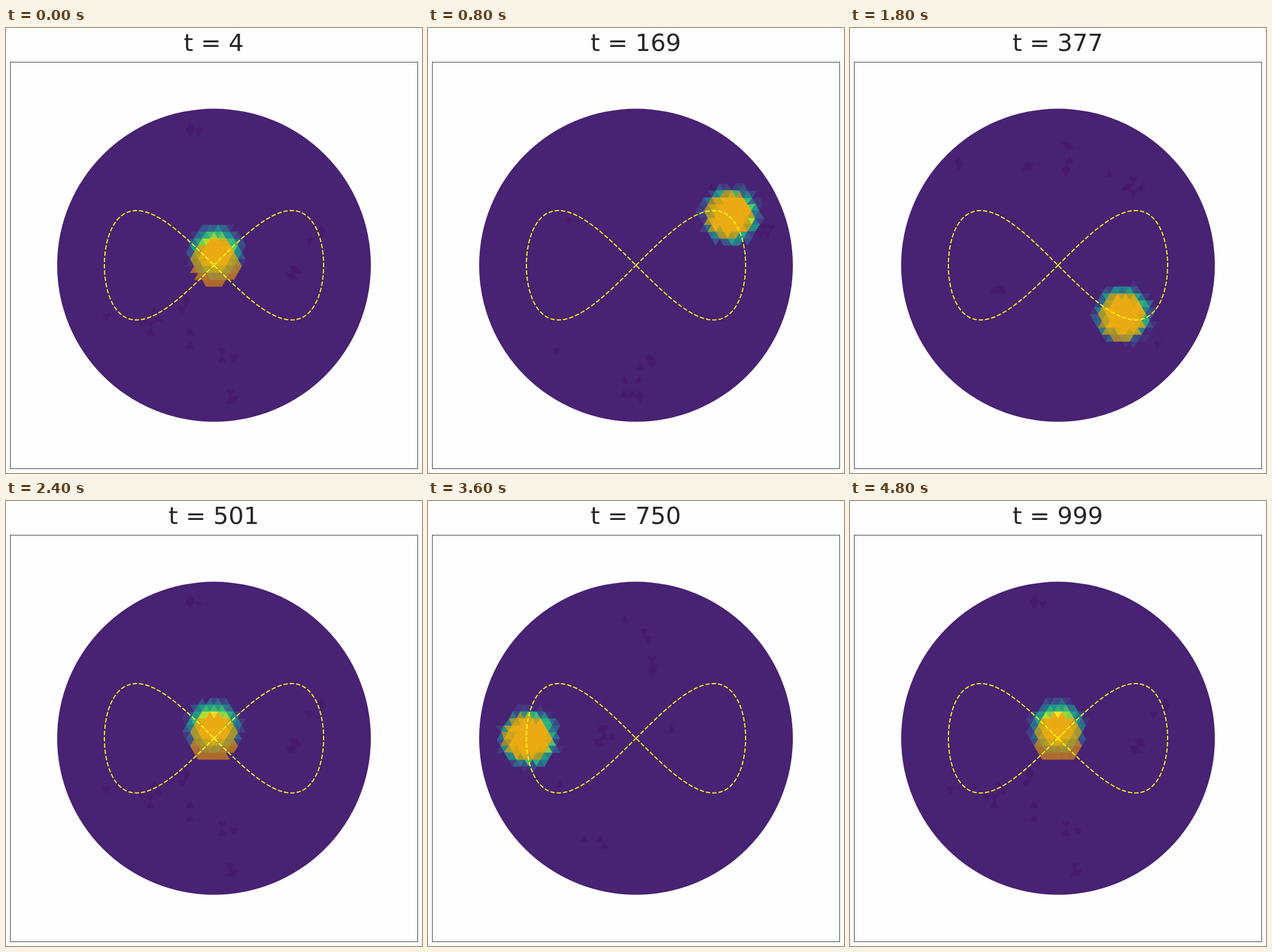
Recreate the animation shown at these times as an HTML page with a canvas. Size 723 px wide and 775 px high, loop 5000 ms.

```html
<!DOCTYPE html>
<html lang="en">
<head>
<meta charset="utf-8">
<title>Moving target reconstruction</title>
<style>
  html, body { margin: 0; width: 100%; height: 100%; overflow: hidden; background: #fefefe; }
  canvas, svg { position: absolute; left: 0; top: 0; }
  text { font: 41.67px "DejaVu Sans", sans-serif; fill: #262626; text-anchor: middle; }
</style>
</head>
<body>
<canvas id="mesh" width="723" height="775"></canvas>
<svg width="723" height="775" viewBox="0 0 723 775">
  <rect x="7.5" y="59.5" width="708" height="708" fill="none" stroke="#262626" stroke-width=".9"/>
  <path id="track" fill="none" stroke="#ffff14" stroke-width="1.9" stroke-dasharray="7.7 3.3"/>
  <text id="title" x="361.2" y="40"></text>
</svg>
<script>
const CX = 361.5, CY = 413.2, RADIUS = 272.6, AMP = 190.5;
const SIDE = 13.85, ROW = 11.95, ROW0 = 414.7;
const STEPS = 25, STEP_MS = 200, TARGET_R = 40.5;
const ctx = document.getElementById('mesh').getContext('2d');
const title = document.getElementById('title');

const rand = n => { const v = Math.sin(n * 12.9898 + 4.1) * 43758.5453; return v - Math.floor(v); };
const mix = (a, b, k) => a + (b - a) * k;
const clamp = v => Math.max(0, Math.min(1, v));

const STOPS = ['440154', '472d7b', '3b528b', '2c728e', '21918c', '28ae80', '5ec962', 'addc30', 'fde725']
  .map(h => [0, 2, 4].map(i => parseInt(h.slice(i, i + 2), 16)));
function viridis(v) {
  const p = clamp(v) * 8, i = Math.min(7, Math.floor(p));
  return `rgb(${STOPS[i].map((c, j) => Math.round(mix(c, STOPS[i + 1][j], p - i)))})`;
}

// Figure of eight travelled at constant speed
const N = 1440, points = [], lengths = [0];
for (let i = 0; i <= N; i++) {
  const a = i / N * 2 * Math.PI;
  points.push([CX + AMP * Math.sin(a), CY - AMP * Math.sin(a) * Math.cos(a)]);
  if (i) lengths.push(lengths[i - 1] + Math.hypot(points[i][0] - points[i - 1][0], points[i][1] - points[i - 1][1]));
}
function along(f) {
  const s = f * lengths[N];
  let i = 1;
  while (i < N && lengths[i] < s) i++;
  const k = (s - lengths[i - 1]) / (lengths[i] - lengths[i - 1]);
  return points[i].map((c, j) => mix(points[i - 1][j], c, k));
}
document.getElementById('track').setAttribute('d',
  'M' + points.filter((p, i) => i % 4 === 0).map(p => p.map(c => c.toFixed(2)).join(' ')).join('L'));

// Triangle mesh, regular inside and slightly uneven near the rim
function node(col, row) {
  const x = CX + (col + (row & 1 ? 0 : .5)) * SIDE, y = ROW0 + row * ROW;
  const r = Math.hypot(x - CX, y - CY), n = col * 57 + row * 131;
  const j = Math.max(0, Math.min(5, (r - 185) * .06));
  return [x + (rand(n) - .5) * j, y + (rand(n + 7) - .5) * j];
}
const cells = [];
function addCell(...p) {
  const x = (p[0][0] + p[1][0] + p[2][0]) / 3, y = (p[0][1] + p[1][1] + p[2][1]) / 3;
  if (Math.hypot(x - CX, y - CY) < RADIUS + 8) cells.push({ p, x, y });
}
for (let row = -24; row < 24; row++) {
  for (let col = -22; col < 22; col++) {
    const s = row & 1 ? 0 : 1;
    const a = node(col, row), b = node(col + 1, row);
    const c = node(col + s, row + 1), d = node(col + s - 1, row + 1);
    addCell(a, b, c);
    addCell(a, c, d);
  }
}
function near(x, y, r) {
  return cells.filter(c => Math.hypot(c.x - x, c.y - y) < r);
}
function trace({ p }) {
  ctx.moveTo(...p[0]);
  ctx.lineTo(...p[1]);
  ctx.lineTo(...p[2]);
  ctx.closePath();
}
function paint(cell, color) {
  ctx.beginPath();
  trace(cell);
  ctx.fillStyle = ctx.strokeStyle = color;
  ctx.fill();
  ctx.stroke();
}

// Faint artefacts in loose clusters; the same ones return at each crossing
function speckle(step) {
  const seed = step % 12 * 211;
  for (let i = 0; i < 9; i++) {
    const n = seed + i * 5, a = rand(n) * 2 * Math.PI, r = 250 * Math.sqrt(rand(n + 1));
    near(CX + r * Math.cos(a), CY + r * Math.sin(a), mix(8, 22, rand(n + 2)))
      .filter((c, j) => rand(n + j * 3.7) < .3)
      .forEach(c => paint(c, '#471b6c'));
  }
}

function draw(step) {
  const t = Math.floor(4 + step * 995 / (STEPS - 1));
  title.textContent = 't = ' + t;
  const [x, y] = along(t / 1000);
  const k = clamp(Math.hypot(x - CX, y - CY) / 180);
  const px = x + 5 * k, py = y - 19 * (1 - k);
  const inner = mix(23, 31, k), outer = mix(51, 56, k);

  ctx.clearRect(0, 0, 723, 775);
  ctx.save();
  ctx.beginPath();
  ctx.arc(CX, CY, RADIUS, 0, 2 * Math.PI);
  ctx.fillStyle = '#482273';
  ctx.fill();
  ctx.clip();
  ctx.lineWidth = .5;
  speckle(step);

  // Reconstructed blob
  near(px, py, outer + 4).forEach((c, i) => {
    const u = (outer - Math.hypot(c.x - px, c.y - py)) / (outer - inner);
    const noise = (rand(i + step * 17) - .5) * mix(.15, .35, k);
    const v = .1 + .9 * clamp(u + noise) ** mix(1, 1.35, k);
    if (v > .13) paint(c, viridis(v));
  });

  // Actual target
  ctx.beginPath();
  near(x, y, TARGET_R).forEach(trace);
  ctx.fillStyle = 'rgba(226,141,10,.66)';
  ctx.fill();
  ctx.restore();
}

let shown = -1;
function tick(now) {
  const step = Math.floor(now / STEP_MS) % STEPS;
  if (step !== shown) draw(shown = step);
  requestAnimationFrame(tick);
}
draw(shown = 0);
requestAnimationFrame(tick);
</script>
</body>
</html>
```
